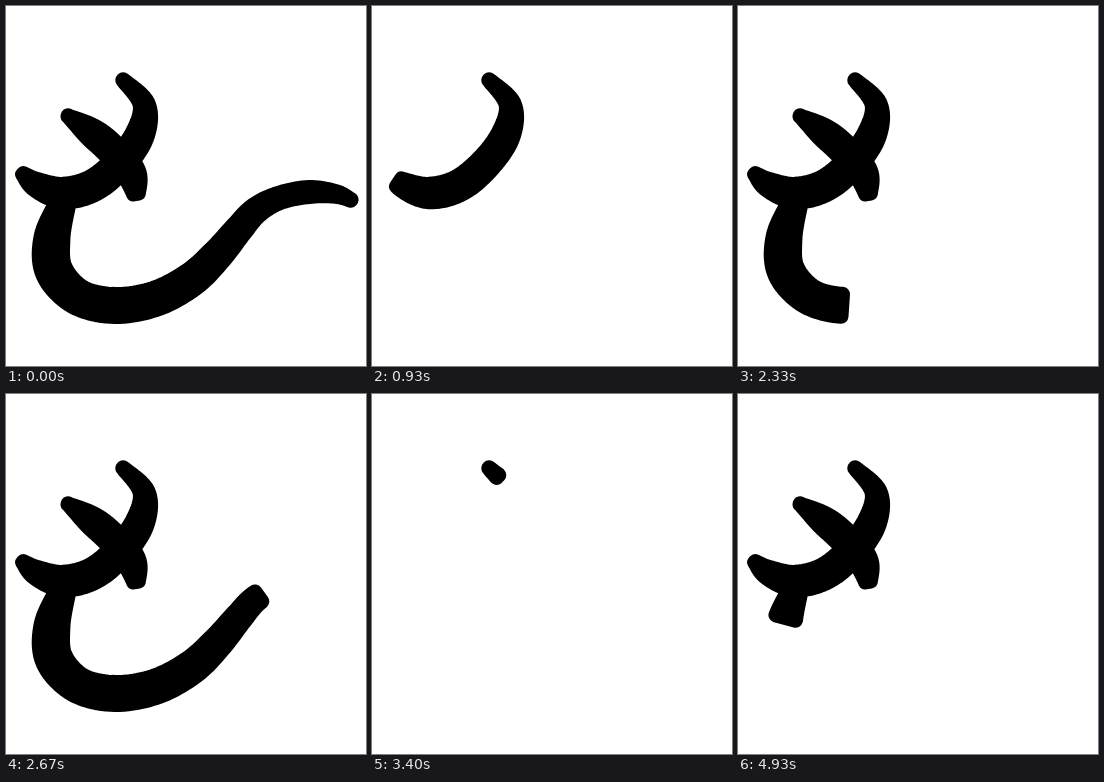
An HTML page that plays this animation: 360x360 px, repeating every 5 s.

```html
<!DOCTYPE html>
<html lang="en">
<head>
<meta charset="utf-8">
<title>Brush strokes</title>
<style>
  html, body { margin: 0; width: 100%; height: 100%; overflow: hidden; background: #fff; }
  svg { display: block; width: 100%; height: 100%; }
  path { fill: #000; stroke: #000; stroke-width: 15; stroke-linejoin: round; }
</style>
</head>
<body>
<svg viewBox="0 0 360 360"></svg>
<script>
const LOOP = 5000, FRAMES = 75;
const FIRST_CLEAR = 6.5, PERIOD = 41.5; // in frames: the stage clears, then all strokes are redrawn
const SPEED = 37;                       // length drawn per frame
const CORNER = 7.5, SAMPLES = 10;

// points: key points [x, y, half width] of the centre line
// start: frames after clearing; first: length in the first frame
const strokes = [
  {
    start: 1.5, first: -25,
    points: [[117,74,7.8],[138,98,11.5],[134.5,127,15],[116,155,16],
      [88,179,16.5],[57,187,16.2],[31,179,13],[17,168,8]]
  },
  {
    start: 15, first: 8,
    points: [[62,110,7.5],[85,126,14.5],[105,143,15.8],[125,167,15.5],[130,187.5,10]]
  },
  {
    start: 25.5, first: 26,
    points: [[56,199,14],[46,232,18.5],[48,265,19.2],[72,291,18.4],[109,299.5,18.5],[150,292.5,18],
      [186,273,17.3],[212,248,16],[233,223,14.5],[250,204.5,13.5],[273,192,12.2],[303,186,12],
      [330,188,9.8],[345,194,7.8]]
  }
];

const mix = (a, b, f) => a + (b - a) * f;

function spline(a, b, c, d, f) {
  return b + f / 2 * (c - a + f * (2 * a - 5 * b + 4 * c - d + f * (3 * (b - c) + d - a)));
}

// Smooth centre line with normals and running length.
function sample(points) {
  const at = i => points[Math.max(0, Math.min(points.length - 1, i))];
  const line = [];
  for (let n = 0; n <= (points.length - 1) * SAMPLES; n++) {
    const i = Math.floor(n / SAMPLES), f = n / SAMPLES - i;
    const [x, y, r] = [0, 1, 2].map(k => spline(at(i - 1)[k], at(i)[k], at(i + 1)[k], at(i + 2)[k], f));
    const last = line[n - 1];
    line.push({ x, y, r, len: last ? last.len + Math.hypot(x - last.x, y - last.y) : 0 });
  }
  line.forEach((p, n) => {
    const a = line[Math.max(0, n - 1)], b = line[Math.min(line.length - 1, n + 1)];
    const d = Math.hypot(b.x - a.x, b.y - a.y);
    p.nx = (a.y - b.y) / d;
    p.ny = (b.x - a.x) / d;
  });
  return line;
}

// Outline up to the given length; the round-joined stroke adds the soft corners.
function outline(line, length) {
  const part = line.filter(p => p.len <= length);
  const next = line[part.length], last = part[part.length - 1];
  if (next) {
    const f = (length - last.len) / (next.len - last.len), tip = {};
    for (const key in last) tip[key] = mix(last[key], next[key], f);
    part.push(tip);
  }
  const side = s => part.map(p => {
    const w = s * Math.max(0.2, p.r - CORNER);
    return (p.x + p.nx * w).toFixed(2) + ' ' + (p.y + p.ny * w).toFixed(2);
  });
  return 'M' + side(1).concat(side(-1).reverse()).join('L') + 'Z';
}

const svg = document.querySelector('svg');
for (const s of strokes) {
  s.line = sample(s.points);
  s.path = svg.appendChild(document.createElementNS(svg.namespaceURI, 'path'));
}

// Frame changes fall on whole hundredths of a second.
function frameAt(time) {
  const frame = Math.round(time * FRAMES / LOOP);
  const start = Math.round(frame * LOOP / FRAMES / 10) * 10;
  return start > time ? frame - 1 : frame;
}

function draw(time) {
  const frame = frameAt(time % LOOP);
  // The loop opens on the finished drawing.
  const age = frame < FIRST_CLEAR ? PERIOD : (frame - FIRST_CLEAR) % PERIOD;
  for (const s of strokes) {
    const steps = Math.floor(age - s.start);
    s.path.setAttribute('d', steps < 0 ? '' : outline(s.line, Math.max(1, s.first + SPEED * steps)));
  }
}

const origin = performance.now();
function tick() {
  draw(performance.now() - origin);
  requestAnimationFrame(tick);
}
tick();
</script>
</body>
</html>
```
